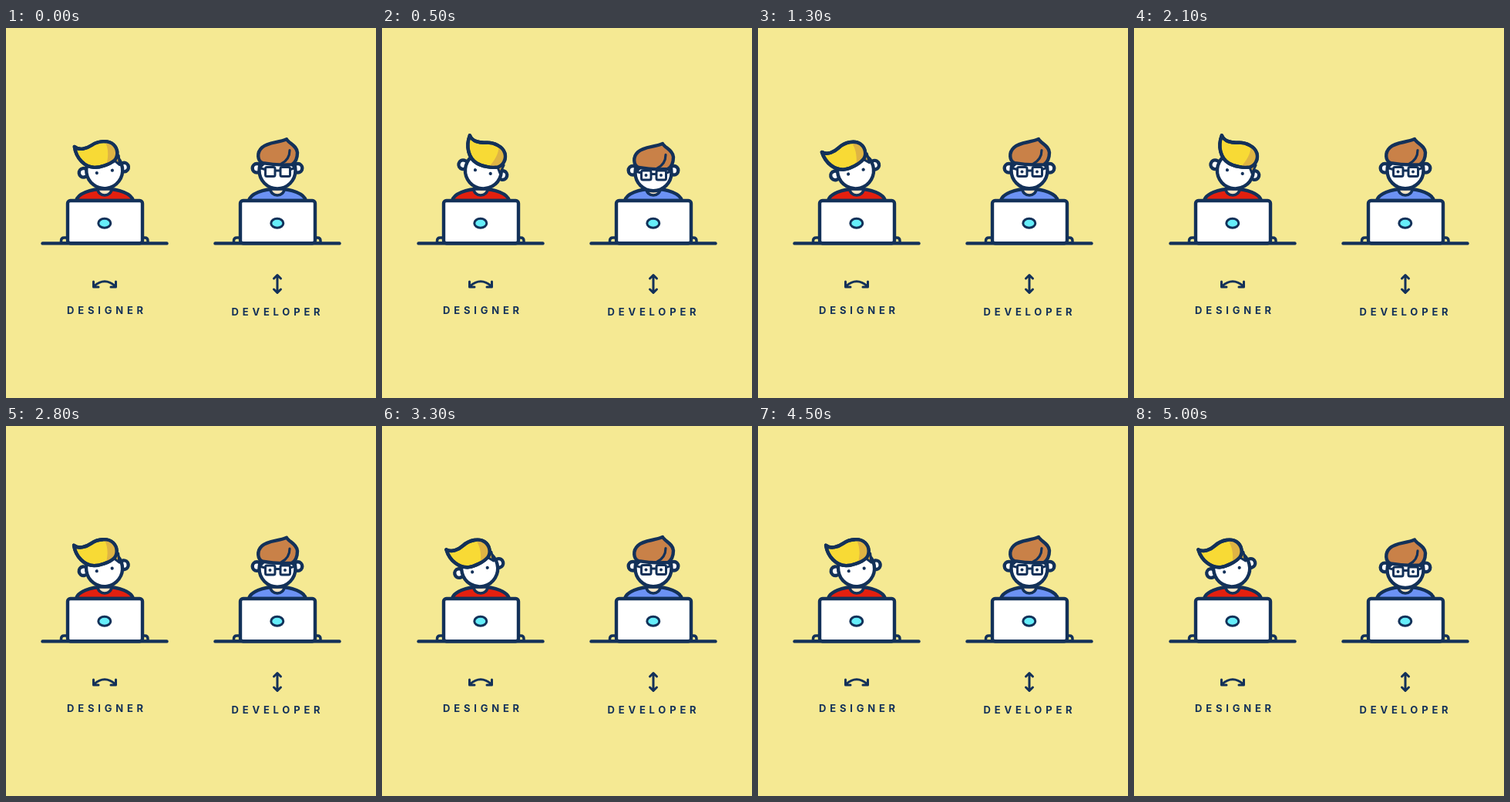
Recreate the animation shown at these times as an HTML page. Size 480 by 480 pixels, loop 5.1 s.

```html
<!DOCTYPE html>
<html lang="en">
<head>
<meta charset="utf-8">
<title>Designer and developer</title>
<style>
html, body { margin: 0; height: 100%; overflow: hidden; background: #f5e993; }
svg { display: block; width: 100vw; height: 100vh; }
text { font: 700 13px Inter, sans-serif; letter-spacing: 4.8px; fill: #133159; stroke: none; }
.line { fill: none; }
.dot { fill: #133159; stroke: none; }
.plain { stroke: none; }
</style>
</head>
<body>
<svg viewBox="0 0 480 480" fill="#fff" stroke="#133159" stroke-width="4.4" stroke-linecap="round" stroke-linejoin="round">
  <defs>
    <g id="torso">
      <path d="M91 224C93 215 109 208.800 128 208.800S163 215 165 224Z"/>
      <path d="M119 209a9 8 0 0 0 18 0Z" fill="#f3e3c4" stroke-width="3.500"/>
    </g>
    <g id="laptop">
      <path d="M71.500 279v-3q0-4 4-4h6V279ZM184 279v-3q0-4-4-4h-6V279Z" fill="#f5e993" stroke-width="3.500"/>
      <rect x="80" y="224" width="97" height="55.300" rx="3.500"/>
      <ellipse cx="127.800" cy="253.300" rx="8" ry="6" fill="#66eefa" stroke-width="3"/>
      <path d="M47.500 279.400H208.500"/>
    </g>
    <g id="ears">
      <circle cx="-26.500" cy="-10" r="5.800"/>
      <circle cx="26.500" cy="-10" r="5.800"/>
    </g>
    <circle id="face" cy="-9.500" r="23.500"/>
    <path id="quiff" d="M-32.500-46.500C-27-40-17-41.500-10-44.500C0-49 13-47 18-40C23-33 21-24 15.500-20C8-15.500-5-14-12-15.500C-24-18-33-31-32.500-46.500Z"/>
    <clipPath id="quiffArea"><use href="#quiff"/></clipPath>
  </defs>

  <use href="#torso" fill="#e3200f"/>
  <g id="designerHead">
    <use href="#ears" x="-.8"/>
    <use href="#face"/>
    <circle class="dot" cx="-10.300" cy="-7.400" r="2.100"/>
    <circle class="dot" cx="10" cy="-8" r="2.100"/>
  </g>
  <g id="designerHair">
    <path d="M17-28L22-25L21-13L15-20Z" fill="#d9a840" stroke-width="3"/>
    <use href="#quiff" fill="#f8da35"/>
    <path class="plain" clip-path="url(#quiffArea)" d="M6-50C12-38 9-25 2-12H30V-50Z" fill="#dfb444"/>
    <use href="#quiff" class="line"/>
  </g>
  <use href="#laptop"/>

  <use href="#torso" x="224" fill="#6c92f4"/>
  <g id="developerHead">
    <use href="#ears" x="352" y="191.500"/>
    <use href="#face" x="352" y="194"/>
  </g>
  <g id="developerHair">
    <path d="M330 171l1 8 4-4ZM374 171l-1 8-4-4Z" fill="#a9673a" stroke-width="3"/>
    <path d="M364 143.500C367 149 377.500 152 378 161C378 169 375 174 371 176.500Q352 178 333 174.500C326 172 325 161 332 154.500C340 147 353 148.500 364 143.500Z" fill="#c98148"/>
    <path class="line" d="M368 158C368 167 364 172 357 175.500" stroke-width="3.200"/>
  </g>
  <g id="glasses" stroke-width="3">
    <path class="line" d="M329 181L336 183M349 184.500H356M369 183L375 181"/>
    <rect x="336.500" y="180" width="12.500" height="12" rx="2"/>
    <rect x="356" y="180" width="12.500" height="12" rx="2"/>
    <g id="pupils">
      <circle class="dot" cx="342.500" cy="186" r="2"/>
      <circle class="dot" cx="362" cy="186" r="2"/>
    </g>
  </g>
  <use href="#laptop" x="224"/>

  <g class="line" stroke-width="3">
    <path d="M114 335Q128 322.500 142 335M113.500 329V336H120M142.500 329V336H136"/>
    <path d="M352 321V343M347.500 325L352 320.500L356.500 325M347.500 339L352 343.500L356.500 339"/>
  </g>
  <text x="79" y="371">DESIGNER</text>
  <text x="292.500" y="373">DEVELOPER</text>
</svg>
<script>
const LOOP = 5100, STEP = 100, SWAY = LOOP / 3, NOD = LOOP / 8;
const part = id => document.getElementById(id);
const place = (id, value) => part(id).setAttribute('transform', value);

function ease(x) {
  x = Math.min(1, Math.max(0, x));
  return x * x * (3 - 2 * x);
}

// -1 leans left, 1 leans right, with a rest at each end
function sway(t) {
  const p = (t + 140) % SWAY;
  return 2 * (ease(p / 440) - ease((p - SWAY / 2 - 80) / 440)) - 1;
}

// Quick dips between longer rests at the top
function nod(t) {
  const wave = (1 + Math.cos(2 * Math.PI * (t - 425) / NOD)) / 2;
  return .6 + 10 * wave ** 3;
}

function draw(now) {
  const t = Math.floor(now % LOOP / STEP) * STEP;
  const lean = sway(t), dip = nod(t);
  place('designerHead', `translate(129 194) rotate(${15 * lean})`);
  place('designerHair', `translate(129 194) rotate(${19.5 * lean})`);
  place('developerHead', `translate(0 ${.45 * dip})`);
  place('glasses', `translate(0 ${.7 * dip})`);
  place('developerHair', `translate(0 ${.9 * dip})`);
  part('pupils').style.display = t < STEP ? 'none' : '';
}

const start = performance.now();
(function tick() {
  draw(performance.now() - start);
  requestAnimationFrame(tick);
})();
</script>
</body>
</html>
```
